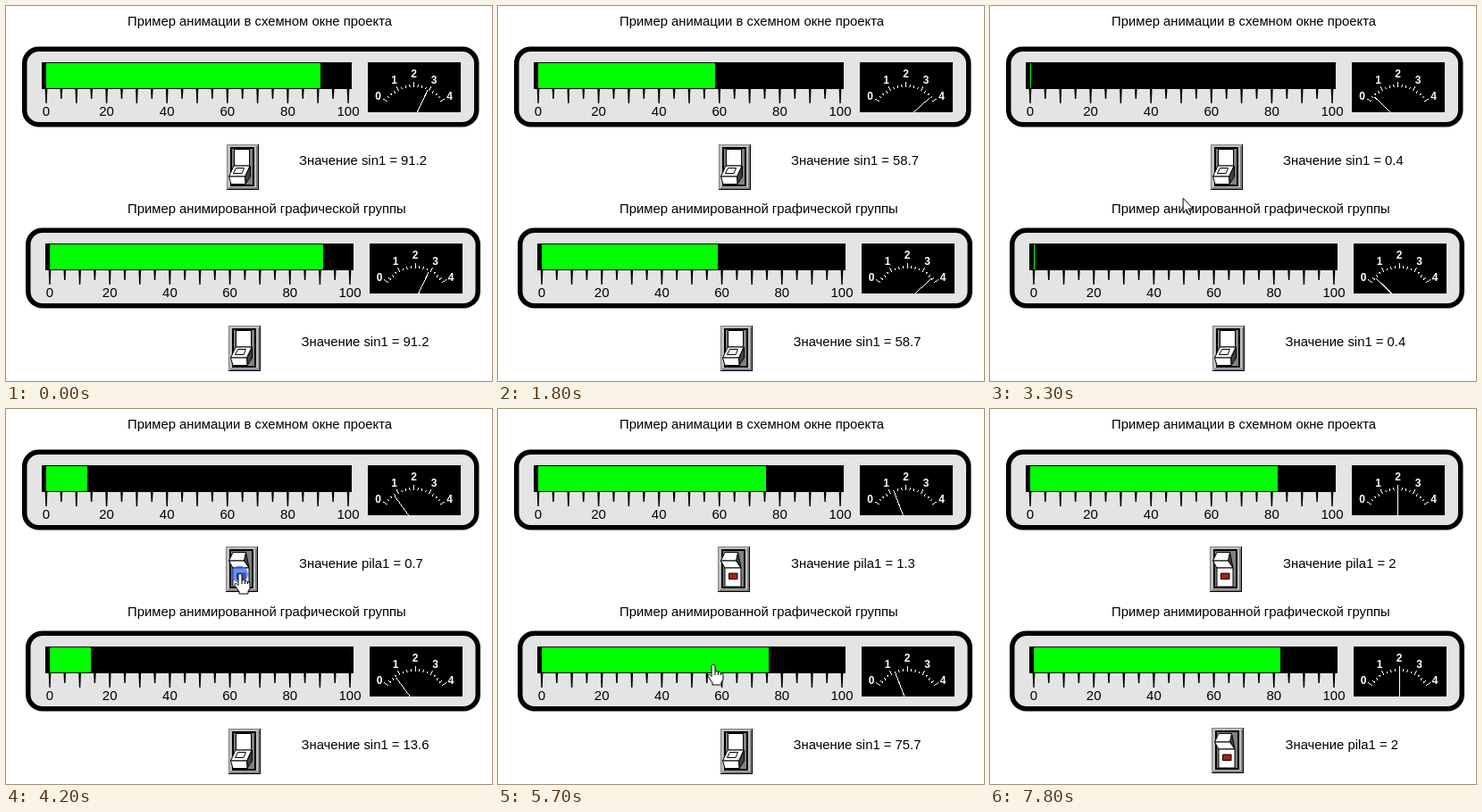
Recreate the animation shown at these times as an HTML page. Size 544 px wide and 420 px high, loop 8 s.

```html
<!DOCTYPE html>
<html lang="ru">
<head>
<meta charset="utf-8">
<title>Приборы</title>
<style>
  html, body { margin: 0; width: 100%; height: 100%; overflow: hidden; background: #fff; }
  svg { display: block; width: 544px; height: 420px; }
  svg svg { width: auto; height: auto; }
  text { font-family: "Liberation Sans", Arial, sans-serif; font-size: 14.85px; white-space: pre; }
  .scale { font-size: 15px; text-anchor: middle; }
  .mark { font-size: 12px; font-weight: bold; fill: #fff; text-anchor: middle; }
  .crisp { shape-rendering: crispEdges; }
</style>
</head>
<body>
<svg id="stage" viewBox="0 0 544 420">
  <defs>
    <g id="frame" class="crisp">
      <path fill="#c0c0c0" d="M0 0h36v51H0z"/>
      <path fill="#808080" d="M33 2h2v48H2v-2h31z"/>
      <path fill="none" stroke="#000" d="M0 50.5H35.5V0"/>
      <path fill="none" stroke="#808080" d="M0 .5H35M.5 0V50"/>
      <path fill="#808080" stroke="#000" stroke-width="2" d="M5 4h25v42H5z"/>
    </g>
    <g id="down">
      <use href="#frame"/>
      <g fill="#fff" stroke="#000" stroke-linejoin="round">
        <path d="M20.500 36L26.500 24V36L21 44.500z" fill="#404040"/>
        <path d="M8.500 5.500h17v18.500h-17z"/>
        <path d="M8 24h18l-5.500 12H2.500z"/>
        <path d="M2.500 36h18l.5 8.500H5z"/>
        <path d="M10.500 26.500h9l-2.500 6H7.500z"/>
      </g>
    </g>
    <g id="up">
      <use href="#frame"/>
      <g fill="#fff" stroke="#000" stroke-linejoin="round">
        <path d="M8 6.500h14.500l3.500 17-5.500-7.500z" fill="#404040"/>
        <path d="M8 6.500h14.500l-2 9.500H3.500z"/>
        <path d="M3.500 16h17l5.500 8H8z"/>
        <path d="M8 24h18v21H8z"/>
        <path d="M12.500 30h9.500v6.500h-9.500z" fill="#b01c10"/>
      </g>
    </g>
    <g id="hand" fill="#fff" stroke="#000" stroke-linejoin="round">
      <path d="M-2 1.500Q0-1.500 2 1.500V8Q4 6.500 5.500 8.500 7.500 7.500 8.500 9.500 11 9 11 12V17L9 20V23H-1V20.500L-6 13.500Q-6.500 11-4 11.500L-2 13.500Z"/>
      <path d="M2 8v4M5.500 8.500V12M8.500 9.500V12" fill="none"/>
    </g>
    <path id="arrow" d="M.5.5V16.500L4.200 13 6.800 19 9.300 18 6.800 12.200H11.800Z" fill="#fff" stroke="#000"/>
  </defs>
</svg>
<script>
const stage = document.getElementById('stage');
const LOOP = 8000, STEP = 300;

// Wave phase in degrees and pointer position, both as [ms, ...values]
const phaseKeys = [[0, 55.5], [1200, 127.06], [2400, 212.96], [4200, 313.28],
  [5100, 356.22], [6600, 443], [7800, 499.8]];
const pointerKeys = [[2400, 146, 261], [3900, 262, 184], [4200, 262, 184], [5100, 215, 186],
  [6300, 267, 386], [6600, 267, 388], [7200, 271, 410]];
const clicks = [4200, 6600];

function add(name, attrs, parent = stage, text) {
  const el = document.createElementNS('http://www.w3.org/2000/svg', name);
  for (const key in attrs) el.setAttribute(key, attrs[key]);
  if (text !== undefined) el.textContent = text;
  return parent.appendChild(el);
}

function box(x, y, width, height, fill = '#000') {
  return add('rect', { x, y, width, height, fill, class: 'crisp' });
}

function label(x, y, text, cls = '') {
  return add('text', { x, y, class: cls }, stage, text);
}

function lerp(keys, t) {
  let i = 1;
  while (i < keys.length - 1 && t > keys[i][0]) i++;
  const a = keys[i - 1], b = keys[i];
  const k = Math.min(1, Math.max(0, (t - a[0]) / (b[0] - a[0])));
  return a.slice(1).map((v, n) => v + (b[n + 1] - v) * k);
}

function bar(x, y, step) {
  box(x - 5, y - 1, Math.round(step * 20) + 9, 30);
  for (let i = 0; i <= 20; i++) {
    const h = i % 2 ? 11 : 16;
    add('path', { d: `M${x + i * step} ${y + 29}m-1.300 0h2.600l-.6 ${h}h-1.400z` });
    if (i % 4 === 0) label(x + i * step, y + 59, i * 5, 'scale');
  }
  return box(x, y, 0, 28, '#0f0');
}

function dial(cx, top) {
  box(Math.round(cx - 51.5), top, 104, 56);
  const face = add('svg', { x: cx - 52, y: top, width: 104, height: 56, viewBox: '-52 -64 104 56' });
  face.style.cssText = 'width:104px;height:56px';
  const line = d => add('path', { d, stroke: '#fff', class: 'crisp' }, face);
  for (let i = 0; i <= 16; i++) {
    line(`M0-36V${i % 4 ? -39 : -42}`).setAttribute('transform', `rotate(${i * 7 - 56})`);
  }
  [[-40, -22], [-22, -40], [0, -47], [22.5, -40], [40, -22]].forEach(([x, y], i) =>
    add('text', { x, y, class: 'mark' }, face, i));
  return line('M0 0V-36');
}

function group(o) {
  label(136, o.titleY, o.title);
  add('rect', { x: o.x + 2.75, y: o.y + 3.25, width: o.w - 5.5, height: 84.5, rx: 16,
    fill: '#e4e4e4', stroke: '#000', 'stroke-width': 5.5 });
  return {
    bar: bar(o.barX, o.y + 19, o.step), span: o.step * 20 - 1,
    needle: dial(o.dialX, o.y + 18),
    knob: add('use', {}), kx: o.knobX, ky: o.knobY,
    text: label(o.textX, o.knobY + 24, ''), click: o.click
  };
}

const groups = [
  group({ title: 'Пример анимации в схемном окне проекта', titleY: 22, x: 18, y: 45, w: 511.5,
    barX: 45, step: 16.9, dialX: 456.5, knobX: 246, knobY: 154, textX: 328, click: clicks[0] }),
  group({ title: 'Пример анимированной графической группы', titleY: 232, x: 22, y: 248, w: 509,
    barX: 49, step: 16.8, dialX: 458, knobX: 248, knobY: 357, textX: 330.5, click: clicks[1] })
];
const glow = add('circle', { r: 9.5, fill: '#2b62f0', opacity: .7 });
const pointer = add('use', {});

const round = v => Math.round(v * 10) / 10;
const show = (el, on) => el.setAttribute('visibility', on ? 'visible' : 'hidden');

function overControl(x, y) {
  const inside = (l, t, r, b) => x >= l && x <= r && y >= t && y <= b;
  return inside(18, 45, 529, 136) || inside(22, 248, 531, 339) ||
    inside(246, 154, 283, 206) || inside(248, 357, 285, 410);
}

function draw(time) {
  const t = Math.floor(time / STEP) * STEP;
  const [phase] = lerp(phaseKeys, t);
  const sine = 50 + 50 * Math.sin(phase * Math.PI / 180);
  const saw = (0.007 * (phase - 212) + 4) % 4;

  for (const g of groups) {
    const on = t >= g.click;
    g.bar.setAttribute('width', g.span * sine / 100);
    g.needle.setAttribute('transform', `rotate(${saw * 28 - 56})`);
    g.knob.setAttribute('href', on ? '#up' : '#down');
    g.knob.setAttribute('x', g.kx + !on);
    g.knob.setAttribute('y', g.ky + !on);
    g.text.textContent = on ? `Значение pila1 = ${round(saw)}` : `Значение sin1 = ${round(sine)}`;
  }

  const [x, y] = lerp(pointerKeys, t);
  show(pointer, t >= 2400 && t <= 7200);
  pointer.setAttribute('href', overControl(x, y) ? '#hand' : '#arrow');
  pointer.setAttribute('x', x);
  pointer.setAttribute('y', y);
  show(glow, clicks.includes(t));
  glow.setAttribute('cx', x - .5);
  glow.setAttribute('cy', y + 1);
}

function tick() {
  draw(performance.now() % LOOP);
  requestAnimationFrame(tick);
}
tick();
</script>
</body>
</html>
```
